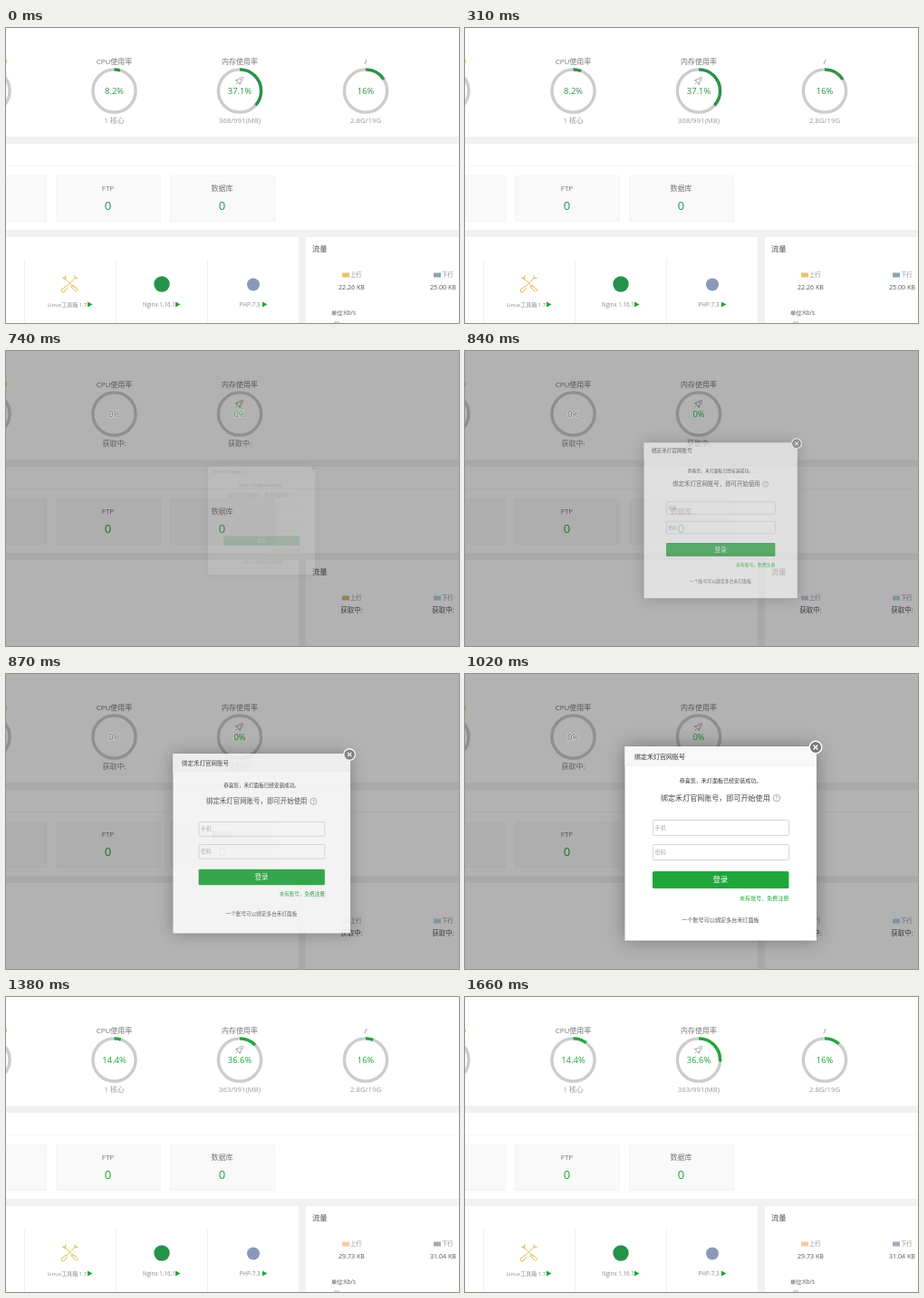
Write an HTML page that moves like this. It is 500 px wide and 326 px high and loops after 1.71 s.

```html
<!DOCTYPE html>
<html lang="zh-CN">
<head>
<meta charset="utf-8">
<title>面板</title>
<style>
html, body { margin: 0; width: 100%; height: 100%; overflow: hidden; background: #fff; }
svg { display: block; width: 100vw; height: 100vh; }
text { font-family: "Open Sans", "Noto Sans CJK SC", "Noto Sans CJK", sans-serif; white-space: pre; }
</style>
</head>
<body>
<svg id="stage" viewBox="0 0 500 326"></svg>
<script>
const LOOP = 1710, GREEN = '#20a53a';
const stage = document.getElementById('stage');

// [start ms, opening progress]
const POPUP_STEPS = [[740, .114], [840, .6], [870, .85], [970, .97], [1020, 1]];

const ramp = (t, from, to) => Math.min(1, Math.max(0, (t - from) / (to - from)));
const rect = (x, y, w, h, fill, more = '') =>
  `<rect x="${x}" y="${y}" width="${w}" height="${h}" fill="${fill}" ${more}/>`;
const circle = (x, y, r, more) => `<circle cx="${x}" cy="${y}" r="${r}" ${more}/>`;
const path = (d, stroke, width, more = '') =>
  `<path d="${d}" fill="none" stroke="${stroke}" stroke-width="${width}" ${more}/>`;
// y is the middle of the line
const text = (x, y, str, size, fill, anchor = 'middle', more = '') =>
  `<text x="${x}" y="${y + size * .36}" font-size="${size}" fill="${fill}" text-anchor="${anchor}" ${more}>${str}</text>`;

function gauge(x, percent, green) {
  const ring = circle(x, 69.5, 23.6, 'fill="none" stroke="#ccc" stroke-width="3.4"');
  if (!percent) return ring;
  return ring + circle(x, 69.5, 23.6, `fill="none" stroke="${green}" stroke-width="3.4" pathLength="100"
    stroke-dasharray="${percent} 100" transform="rotate(-90 ${x} 69.5)"`);
}

const rocket = `<g transform="translate(258 58) rotate(45) scale(.9)">` +
  path('M0-5.5C2.6-3 2.6 0 1.8 3H-1.8C-2.6 0-2.6-3 0-5.5ZM-2.1 0L-4 3.5L-1.8 3M2.1 0L4 3.5L1.8 3M0 4V6.5', '#999', .8) +
  circle(0, -1.5, .9, 'fill="none" stroke="#999" stroke-width=".6"') + '</g>';

const tools = path('M65 276.5L76 287.5M76.5 276L66 286.5', '#e5bd55', 1) +
  path('M74 284L79.5 289.5L77.5 291.5L72 286ZM66 285L63 288A2 2 0 1 0 65 290L68 287', '#e5bd55', 1) +
  path('M62 275.5L65 277.5L66 273.5M76 273.5L76.5 276.5L79.5 276.5', '#e5bd55', 1.2);

function software() {
  const apps = [[46, 'Linux工具箱 1.7', 90, 6], [151, 'Nginx 1.16.1', 187, 6.2], [257.5, 'PHP-7.3', 283, 6.3]];
  return [20.5, 121.5, 222.5].map(x => path(`M${x} 256V326`, '#f1f1f1', 1)).join('') +
    tools + circle(172, 283, 8.7, `fill="#25924a"`) + circle(273, 283.5, 7, 'fill="#8b99b8"') +
    apps.map(([x, name, end, size]) => text(x, 305.5, name, size, '#888', 'start') +
      `<path d="M${end} 302.5L${end + 5.5} 305.5L${end} 308.5Z" fill="${GREEN}"/>`).join('');
}

function panels(green) {
  return rect(0, 0, 500, 326, '#f1f1f1') +
    rect(0, 0, 500, 120, '#fff') + rect(0, 128, 500, 95, '#fff') +
    rect(0, 231, 323, 95, '#fff') + rect(331, 231, 169, 95, '#fff') +
    path('M0 152.5H500', '#f8f8f8', 1) +
    [-71, 55, 181].map(x => rect(x + .5, 163.5, 115, 50, '#f9f9f9', 'stroke="#f4f4f4"')).join('') +
    text(112.5, 177.5, 'FTP', 8, '#777') + text(238.5, 177.5, '数据库', 8, '#777') +
    text(112.5, 196.5, '0', 13, green) + text(238.5, 196.5, '0', 13, green) +
    text(338, 244, '流量', 8.3, '#555', 'start') + rect(0, 35, 1, 4, '#f2c878');
}

function traffic(up, down, size, colors) {
  return rect(371, 270.5, 8, 5, colors[0]) + rect(472, 270.5, 8, 5, colors[1]) +
    text(380, 273, '上行', 6.3, '#888', 'start') + text(481, 273, '下行', 6.3, '#888', 'start') +
    text(381.5, 286, up, size, '#555') + text(482.5, 286, down, size, '#555');
}

const chartLabel = text(359, 315, '单位:Kb/s', 6.2, '#555', 'start') +
  text(365, 326, '60', 5, '#777');

function gaugeLabels(x, title, value, detail, green) {
  return text(x, 37, title, 8, '#777') + text(x, 69.5, value, 9.4, green) +
    text(x, 102, detail, 7.8, '#999');
}

function dashboard(d, arcs, loaded) {
  return panels(d.green) + gauge(-19.5, 0) +
    [119.5, 258, 397].map((x, i) => gauge(x, arcs[i], d.green)).join('') +
    gaugeLabels(119.5, 'CPU使用率', d.cpu + '%', '1 核心', d.green) +
    gaugeLabels(258, '内存使用率', d.mem + '%', d.used + '/991(MB)', d.green) +
    gaugeLabels(397, '/', '16%', '2.8G/19G', d.green) + rocket +
    traffic(d.up + ' KB', d.down + ' KB', 7.1, d.colors) +
    (loaded ? software() + chartLabel : '');
}

function popup(p) {
  const scale = .5 + p / 2;
  const field = (y, label) => rect(207.5, y + .5, 150, 17, '#fff', 'stroke="#ccc" stroke-width=".8" rx="1"') +
    text(209.5, y + 9, label, 6.2, '#aaa', 'start');
  return `<g opacity="${p}" transform="translate(282 187.5) scale(${scale}) translate(-282 -187.5)">` +
    rect(176.5, 80, 211.5, 214.5, '#fff', 'style="filter:drop-shadow(0 0 10px #0005)"') +
    rect(176.5, 80, 211.5, 21, '#f8f8f8') + path('M176.5 101H388', '#eee', .7) +
    text(187, 91, '绑定禾灯官网账号', 7, '#333', 'start') +
    text(282, 118, '恭喜您，禾灯面板已经安装成功。', 6.05, '#333') +
    text(216, 137, '绑定禾灯官网账号，即可开始使用', 8.05, '#444', 'start') +
    circle(344, 137, 3.8, 'fill="none" stroke="#888" stroke-width=".7"') + text(344, 137, '?', 6, '#777') +
    field(161, '手机') + field(188, '密码') +
    rect(207, 218, 150.5, 19, GREEN, 'rx="1.5"') + text(282, 227.5, '登录', 8.2, '#fff') +
    text(357.5, 248, '未有账号，免费注册', 6.05, GREEN, 'end') +
    text(282, 271.5, '一个账号可以绑定多台禾灯面板', 6.1, '#555') +
    circle(387, 81, 6.8, 'fill="#737a76" stroke="#fff" stroke-width="1.5"') +
    path('M384.6 78.6L389.4 83.4M389.4 78.6L384.6 83.4', '#fff', 1.4) + '</g>';
}

function loginPage(t) {
  const p = POPUP_STEPS.filter(([start]) => t >= start).pop()[1];
  const ghost = 'stroke="#ddd" stroke-width="1.2" paint-order="stroke"';
  const started = t >= 840;
  return panels(GREEN) + [-19.5, 119.5, 258].map(x => gauge(x, 0)).join('') +
    text(119.5, 37, 'CPU使用率', 8, '#777') + text(258, 37, '内存使用率', 8, '#777') +
    text(119.5, 102, '获取中:', 8, '#888') + text(258, 102, '获取中:', 8, '#888') + rocket +
    traffic('获取中:', '获取中:', 7.5, [started ? '#b5d3e6' : '#dcb878', '#b5d3e6']) +
    rect(0, 0, 500, 326, '#000', 'opacity=".3"') +
    text(119.5, 69.5, '0%', 9, '#666', 'middle', ghost) +
    (started ? text(258, 69.5, '0%', 9.4, '#17802c') : text(258, 69.5, '0%', 9, '#3f7a4a', 'middle', ghost)) +
    popup(p);
}

const BEFORE = { cpu: 8.2, mem: 37.1, used: 368, up: '22.26', down: '25.00', green: '#2b9345', colors: ['#e6c568', '#8ba5b2'] };
const AFTER = { cpu: 14.4, mem: 36.6, used: 363, up: '29.73', down: '31.04', green: GREEN, colors: ['#f0cf9c', '#a0adb5'] };

function scene(t) {
  if (t < 740) {
    const p = ramp(t, 50, 690);
    return dashboard(BEFORE, [4.4 + 3.8 * p, 36.7 + .4 * p, 16], true);
  }
  if (t < 1100) return loginPage(t);
  const p = .72 * ramp(t, 1120, 1660);
  return dashboard(AFTER, [14.4 * p, 36.6 * p, 16 * p], t >= 1300);
}

const begin = performance.now();
function frame() {
  stage.innerHTML = scene((performance.now() - begin) % LOOP);
  requestAnimationFrame(frame);
}
frame();
</script>
</body>
</html>
```
